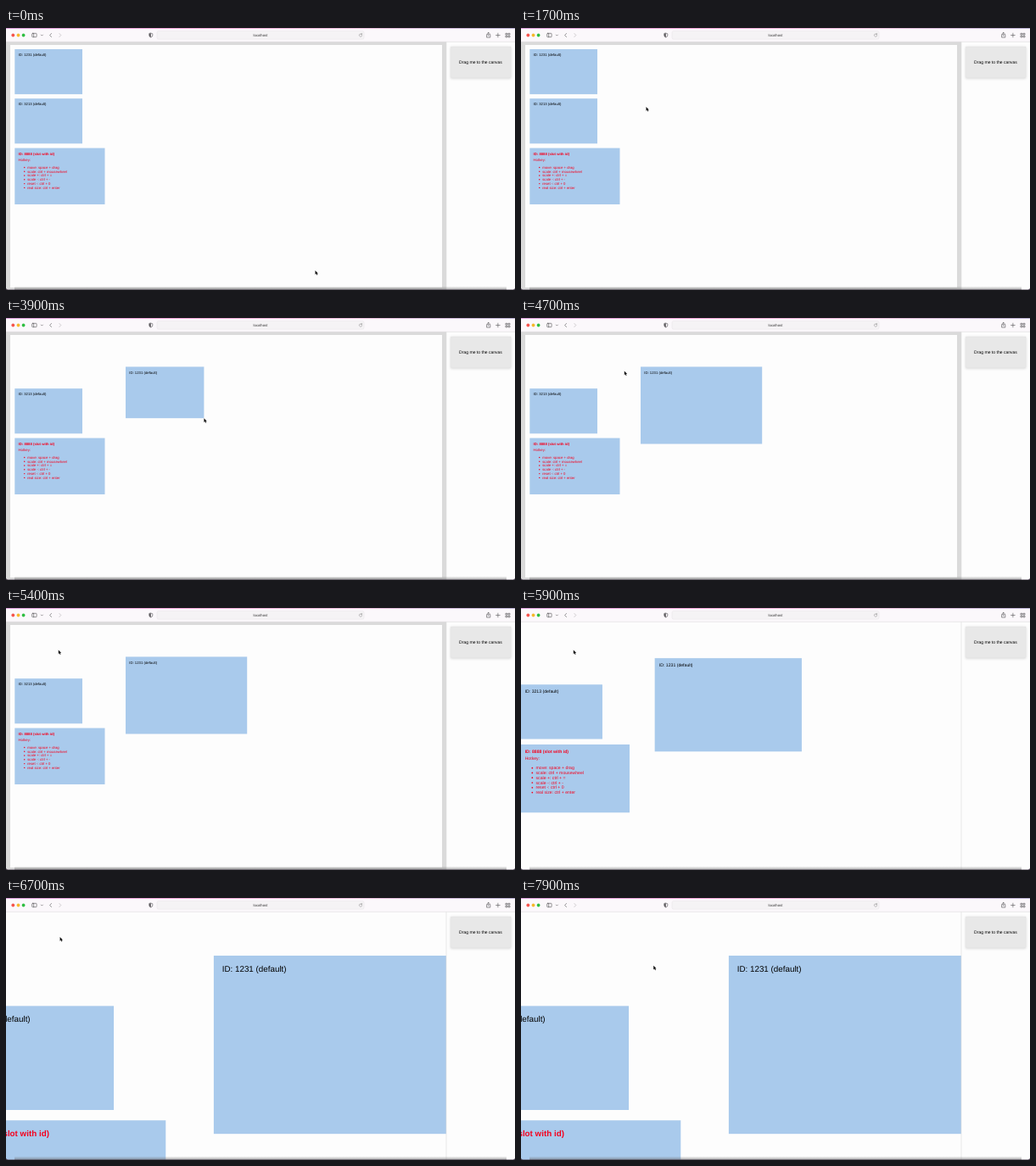
An HTML page that plays this animation: 600x309 px, repeating every 8000 ms.

```html
<!DOCTYPE html>
<html lang="en">
<head>
<meta charset="utf-8">
<title>Canvas drag, resize and zoom</title>
<style>
  html, body { margin: 0; width: 100%; height: 100%; overflow: hidden; background: #fdfdfd; }
  svg { display: block; width: 100%; height: 100%; }
  text { font: 4.25px "Liberation Sans", Arial, sans-serif; text-rendering: geometricPrecision; }
  .box { fill: #a9caec; }
  .red { fill: #f5001d; }
  .icon { fill: none; stroke: #5c5a5e; stroke-width: .65; stroke-linecap: round; stroke-linejoin: round; }
</style>
</head>
<body>
<svg viewBox="0 0 600 309" preserveAspectRatio="none">
  <defs>
    <clipPath id="view"><rect y="16" width="519" height="293"/></clipPath>
    <linearGradient id="sky">
      <stop offset="0" stop-color="#dc9fdc"/>
      <stop offset=".35" stop-color="#f3a6d8"/>
      <stop offset=".7" stop-color="#ecc0de"/>
      <stop offset="1" stop-color="#b9b0d2"/>
    </linearGradient>
    <linearGradient id="fade" x2="0" y2="1">
      <stop offset="0" stop-color="#777" stop-opacity="0"/>
      <stop offset="1" stop-color="#666" stop-opacity=".6"/>
    </linearGradient>
    <filter id="soft" x="-20%" y="-20%" width="140%" height="150%">
      <feDropShadow dx="0" dy=".8" stdDeviation="1.6" flood-color="#000" flood-opacity=".16"/>
    </filter>
  </defs>

  <rect width="600" height="309" fill="#fdfdfd"/>

  <g clip-path="url(#view)">
    <rect y="16" width="519" height="293" fill="#dadada"/>
    <g id="world">
      <rect x="5" y="20" width="509" height="286" fill="#fdfdfd"/>
      <g transform="translate(10.3 83.2)">
        <rect class="box" width="79.7" height="53.1"/>
        <text x="4.25" y="8.2">ID: 3213 (default)</text>
      </g>
      <g id="notes" class="red" transform="translate(10.3 141.6)">
        <rect class="box" width="106.2" height="66.4"/>
        <text x="4.25" y="8.2" font-weight="bold" style="font-weight:bold">ID: 8888 (slot with id)</text>
        <text x="4.25" y="15.2">Hotkey:</text>
      </g>
      <g id="card">
        <rect id="cardRect" class="box"/>
        <text x="4.25" y="8.2">ID: 1231 (default)</text>
      </g>
    </g>
  </g>

  <!-- side panel -->
  <rect x="519" y="16" width="81" height="293" fill="#fdfdfd"/>
  <path d="M519 16V309" stroke="#dedede" stroke-width=".7"/>
  <rect x="524.2" y="22" width="71" height="36.8" rx=".8" fill="#e8e8e8" stroke="#dcdcdc" stroke-width=".4" filter="url(#soft)"/>
  <text x="559.5" y="41.9" text-anchor="middle" style="font-size:5.05px">Drag me to the canvas</text>

  <!-- browser bar -->
  <rect width="600" height="16.2" fill="#fbf8fb"/>
  <rect width="600" height="1" fill="url(#sky)"/>
  <path d="M0 16.3H600" stroke="#dcd9dc" stroke-width=".6"/>
  <circle cx="8.3" cy="8.5" r="1.9" fill="#f5544d"/>
  <circle cx="14.5" cy="8.5" r="1.9" fill="#f6b92f"/>
  <circle cx="20.6" cy="8.5" r="1.9" fill="#2fbf42"/>
  <rect x="178" y="3.6" width="244" height="9.6" rx="1.8" fill="#f5f3f5" stroke="#e6e3e6" stroke-width=".5"/>
  <text x="300" y="10" text-anchor="middle" fill="#333">localhost</text>
  <g class="icon">
    <rect x="30.7" y="6.3" width="5.4" height="4.4" rx=".7"/>
    <path d="M32.7 6.3V10.7M41.4 8.1l1 1 1-1M53.5 6.5l-1.9 2 1.9 2"/>
    <path d="M62.9 6.5l1.9 2-1.9 2" stroke="#b5b2b5"/>
    <path d="M170.8 6.1l2 .7v1.9q0 1.6-2 2.4q-2-.8-2-2.4V6.8z"/>
    <path d="M170.8 6.1l-2 .7v1.9q0 1.6 2 2.4z" fill="#5c5a5e" stroke="none"/>
    <path d="M419.4 7.5a1.7 1.7 0 1 0 .3 1.3M419.5 6.3v1.3h-1.3" stroke="#888" stroke-width=".5"/>
    <path d="M567.6 7.6h-1v3.5h4.2V7.6h-1M568.7 9.2V5.3M567.5 6.4l1.2-1.2 1.2 1.2M577.6 8.5h4.6M579.9 6.2v4.6"/>
    <path d="M589.3 6.3h1.7v1.7h-1.7zM592.3 6.3h1.7v1.7h-1.7zM589.3 9.2h1.7v1.7h-1.7zM592.3 9.2h1.7v1.7h-1.7z"/>
  </g>

  <!-- window bottom edge -->
  <rect x="10" y="304.5" width="580" height="4.5" fill="url(#fade)"/>
  <path d="M0 306.8Q.4 308.4 2.4 308.5H597.6Q599.6 308.4 600 306.8V309H0z" fill="#4a4050"/>

  <path id="cursor" d="M0 0V4.7L1.1 3.7 1.9 5.4 2.8 5 2 3.4H3.4z" fill="#111" stroke="#fff" stroke-width=".45" stroke-linejoin="round" paint-order="stroke"/>
</svg>
<script>
const LOOP = 8000, TICK = 100;
const PIVOT = [61.7, 49.5];
const $ = id => document.getElementById(id);

// Rows: time, then values
const cursorPath = [
  [0, 364.5, 286], [100, 361, 283], [400, 325, 243], [500, 325, 243],
  [800, 264, 186], [1000, 260, 182], [1600, 148, 94], [1700, 147.5, 93],
  [2000, 69, 60], [2300, 69, 60], [2600, 155, 79], [2800, 189.8, 85.5],
  [3100, 199.8, 92.4], [3200, 199.8, 92.4], [3600, 220.7, 110.7], [3800, 220.7, 110.7],
  [4300, 284.2, 148.6], [4400, 284.2, 148.6], [4700, 121.8, 62.5],
  [5100, 61.8, 49.5], [6200, 61.8, 49.5], [6400, 63.6, 46], [6700, 63.6, 46],
  [7200, 250, 103], [7500, 260, 106], [7800, 163, 82], [7900, 156.2, 79.8]
];
const cardPlace = [
  [2300, 10.3, 25], [2600, 96.3, 44], [2800, 131, 50.6], [3100, 141, 57.5]
];
const cardSize = [[3800, 79.7, 53.1], [4300, 143.2, 91]];
const zoomLevel = [[5600, 1], [5900, 1.21], [6200, 1.75], [6400, 2.31]];

function at(rows, t) {
  const i = rows.findIndex(r => r[0] > t);
  if (i === 0) return rows[0].slice(1);
  if (i < 0) return rows[rows.length - 1].slice(1);
  const a = rows[i - 1], b = rows[i];
  const p = (t - a[0]) / (b[0] - a[0]);
  return a.slice(1).map((v, k) => v + (b[k + 1] - v) * p);
}

function add(tag, attrs, label = "") {
  const el = document.createElementNS("http://www.w3.org/2000/svg", tag);
  for (const k in attrs) el.setAttribute(k, attrs[k]);
  el.textContent = label;
  $("notes").append(el);
}

["move: space + drag", "scale: ctrl + mousewheel", "scale +: ctrl + =",
 "scale -: ctrl + -", "reset -: ctrl + 0", "real size: ctrl + enter"].forEach((label, i) => {
  const y = 24.3 + i * 4.78;
  add("circle", { cx: 11.4, cy: y - 1.4, r: .72 });
  add("text", { x: 14.9, y }, label);
});

function draw(t) {
  const [w, h] = at(cardSize, t), [zoom] = at(zoomLevel, t);
  const shift = PIVOT.map(v => v * (1 - zoom));
  $("card").setAttribute("transform", `translate(${at(cardPlace, t)})`);
  $("cardRect").setAttribute("width", w);
  $("cardRect").setAttribute("height", h);
  $("world").setAttribute("transform", `translate(${shift}) scale(${zoom})`);
  $("cursor").setAttribute("transform", `translate(${at(cursorPath, t)})`);
}

const start = performance.now();
function loop() {
  const t = (performance.now() - start) % LOOP;
  draw(Math.floor(t / TICK) * TICK);
  requestAnimationFrame(loop);
}
loop();
</script>
</body>
</html>
```
